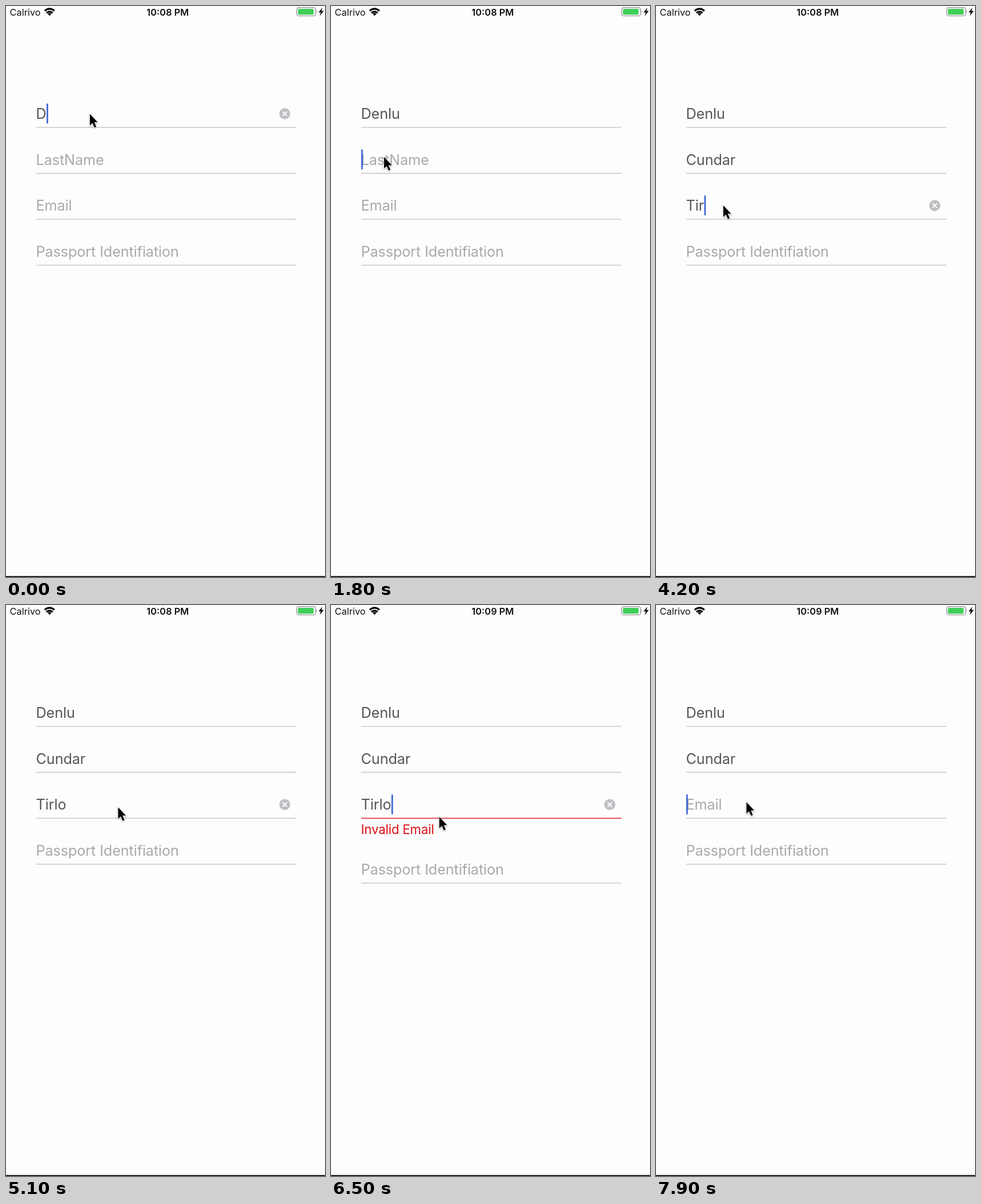
Recreate the animation shown at these times as an HTML page. Size 559x1002 px, loop 8 s.

```html
<!DOCTYPE html>
<html lang="en">
<head>
<meta charset="utf-8">
<title>Form validation</title>
<style>
  html, body { margin: 0; height: 100%; overflow: hidden; background: #fefdfe; }
  svg { display: block; width: 559px; height: 1002px; font-family: Inter, Roboto, sans-serif; }
  .status { font-size: 16.4px; fill: #111; }
  .clock { font-weight: 600; text-anchor: middle; }
  .value { font-size: 25.3px; letter-spacing: -.15px; fill: #565658; }
  .hint { fill: #a9a9ac; }
  .rule { stroke: #c9c9cc; stroke-width: 1.6; }
  #error { font-size: 22.2px; letter-spacing: -.15px; fill: #dc1018; }
  #caret { fill: #3c66d6; }
  #mouse { filter: drop-shadow(0 1.5px 1.5px rgba(0, 0, 0, .35)); }
</style>
</head>
<body>
<svg viewBox="0 0 559 1002">
  <text class="status" x="6.5" y="16.5">Calrivo</text>
  <g fill="none" stroke="#000" stroke-width="3.2">
    <path d="M67.8 8.6Q76.3 1.2 84.8 8.6M71 12.2Q76.3 7.6 81.6 12.2"/>
    <path d="M73 13.6Q76.3 11 79.6 13.6L76.3 17.4Z" fill="#000" stroke="none"/>
  </g>
  <text class="status clock" id="clock" x="283.4" y="16.5"></text>
  <rect x="509.4" y="2.8" width="33.2" height="14.6" rx="3.6" fill="none" stroke="#98989b" stroke-width="1.4"/>
  <rect x="511.6" y="5" width="27.4" height="10.2" rx="1.8" fill="#3fce58"/>
  <path d="M543.8 7.6Q546 10.1 543.8 12.6Z" fill="#98989b"/>
  <path d="M554.2 3L547.8 11.2H551.6L549.8 17.6L556.8 8.8H552.8Z"/>

  <g id="fields"></g>
  <text id="error" x="52.5" y="402">Invalid Email</text>
  <g id="clear">
    <circle cx="488.5" cy="189" r="9.7" fill="#bfbfc3"/>
    <path d="M484.6 185.1l7.8 7.8m0-7.8l-7.8 7.8" stroke="#fff" stroke-width="2"/>
  </g>
  <rect id="caret" y="171.3" width="2.7" height="34.8"/>
  <rect y="1000.4" width="559" height="1.6"/>
  <path id="mouse" d="M0 0V20L4.6 15.9L8 23.8L11.2 22.4L7.8 14.6H13.7Z"
        stroke="#fff" stroke-width="1.6" paint-order="stroke"/>
</svg>
<script>
const LOOP = 8000, STEP = 100, LEFT = 52.5, PITCH = 80.6, EMAIL = 2;
const $ = id => document.getElementById(id);

// focus: when the field is clicked; typed / erased: key press times
const fields = [
  { hint: 'FirstName', text: 'Denlu', focus: -500, typed: [-100, 100, 600, 700, 800], erased: [] },
  { hint: 'LastName', text: 'Cundar', focus: 1500, typed: [2100, 2300, 2400, 2500, 2700, 2800], erased: [] },
  { hint: 'Email', text: 'Tirlo', focus: 3400, typed: [3900, 4100, 4200, 4300, 4400],
    erased: [6900, 7100, 7300, 7400, 7700] },
  { hint: 'Passport Identifiation', text: '', focus: Infinity, typed: [], erased: [] }
];

// time, x, y of the pointer tip
const path = [
  [0, 147, 189.5], [900, 147, 189.5], [1400, 93, 265], [2600, 93, 265], [3200, 118, 350],
  [4600, 118, 350], [5100, 196.5, 355], [5400, 197.5, 391], [5800, 197.5, 384.5],
  [6300, 197.5, 378], [7000, 158.5, 346]
];

const clamp = v => Math.min(1, Math.max(0, v));
const ease = v => { v = clamp(v); return v * v * (3 - 2 * v); };
const place = (el, x, y) => el.setAttribute('transform', `translate(${x} ${y})`);

fields.forEach((f, i) => {
  $('fields').insertAdjacentHTML('beforeend',
    `<g><text class="value" x="${LEFT}" y="198.3"></text><path class="rule" d="M53 213H509"/></g>`);
  f.group = $('fields').lastElementChild;
  [f.label, f.rule] = f.group.children;
  place(f.group, 0, i * PITCH);
});

function pointer(t) {
  const next = path.findIndex(p => p[0] > t);
  if (next < 0) return path[path.length - 1].slice(1);
  const [a, b] = [path[next - 1], path[next]];
  const k = ease((t - a[0]) / (b[0] - a[0]));
  return [a[1] + (b[1] - a[1]) * k, a[2] + (b[2] - a[2]) * k];
}

// solid, fade out, pause, fade in
function blink(age) {
  const p = age % 1000;
  return p < 650 ? 1 - clamp((p - 450) / 200) : clamp((p - 850) / 150);
}

function draw(t) {
  const past = list => list.filter(k => k <= t);
  let active = 0;
  fields.forEach((f, i) => {
    f.value = f.text.slice(0, past(f.typed).length - past(f.erased).length);
    f.label.textContent = f.value || f.hint;
    f.label.classList.toggle('hint', !f.value);
    if (f.focus <= t) active = i;
  });

  const f = fields[active], top = active * PITCH;
  const lastKey = Math.max(f.focus, ...past(f.typed), ...past(f.erased));
  const width = f.value ? f.label.getComputedTextLength() : 0;
  place($('caret'), LEFT + .5 + width, top);
  $('caret').style.opacity = blink(t - lastKey);
  place($('clear'), 0, top);
  $('clear').style.opacity = f.value ? 1 : 0;

  const shown = ease((t - 5400) / 300) - ease((t - 7600) / 300);
  $('error').style.opacity = shown;
  fields[EMAIL].rule.style.stroke = shown > 0 ? '#d3262c' : '';
  place(fields[3].group, 0, 3 * PITCH + 33.2 * shown);

  place($('mouse'), ...pointer(t));
  $('clock').textContent = t < 6000 ? '10:08 PM' : '10:09 PM';
}

function frame() {
  draw(Math.floor(performance.now() % LOOP / STEP) * STEP);
  requestAnimationFrame(frame);
}
frame();
</script>
</body>
</html>
```
